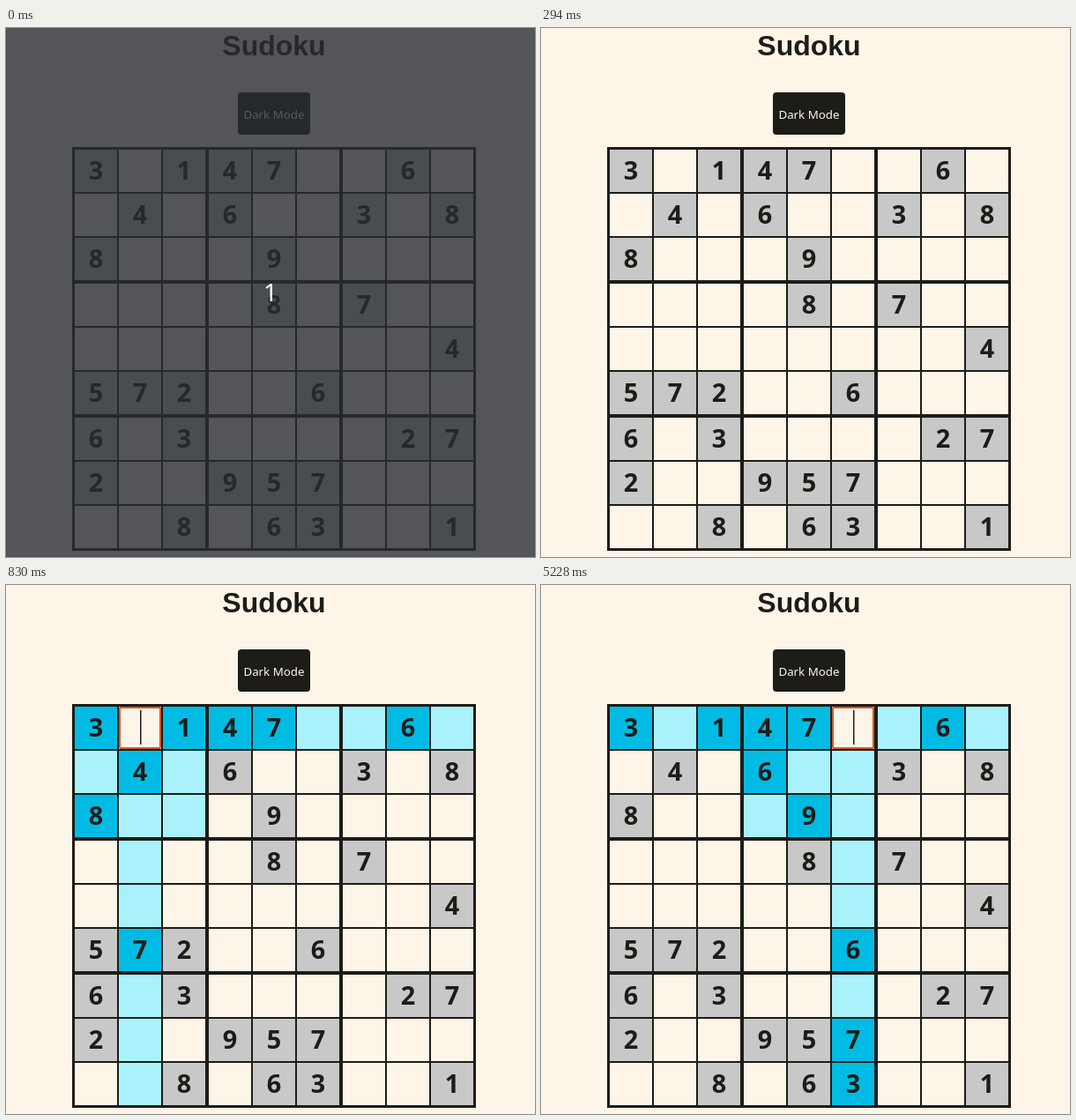
Animation of 600 by 600 pixels, one loop 8000 ms. Source, as an HTML page:

```html
<!DOCTYPE html>
<html lang="en">
<head>
<meta charset="utf-8">
<title>Sudoku</title>
<style>
  html, body { margin: 0; width: 100%; height: 100%; overflow: hidden; }
  svg { display: block; width: 100vw; height: 100vh; }
  text { text-anchor: middle; font-family: "Noto Sans", "Open Sans", sans-serif; }
  .title { font: bold 32px "Liberation Sans", Arial, sans-serif; }
  .label { font-size: 13.333px; }
  .digit { font-size: 28.8px; font-weight: bold; }
  .count { font-size: 28px; }
</style>
</head>
<body>
<svg id="stage" viewBox="0 0 600 600"></svg>
<script>
const LOOP = 8000;
const START = 30;
const PICKS = [
  { at: 470, row: 0, col: 1 },
  { at: 1070, row: 0, col: 5 }
];
const PUZZLE = [
  "3.147..6.",
  ".4.6..3.8",
  "8...9....",
  "....8.7..",
  "........4",
  "572..6...",
  "6.3....27",
  "2..957...",
  "..8.63..1"
];
const BRIGHT = {
  page: "#fef5e9", ink: "#1d1c17", label: "#fef5e9", given: "#c8c8c8",
  litGiven: "#00bce4", lit: "#a9f2fc"
};
const DIMMED = { page: "#545559", ink: "#25292d", label: "#575a5d", given: "#484d50" };
const CELL = 48;

const stage = document.getElementById("stage");

function add(tag, attrs, content = "") {
  const el = document.createElementNS("http://www.w3.org/2000/svg", tag);
  for (const key in attrs) el.setAttribute(key, attrs[key]);
  el.textContent = content;
  stage.appendChild(el);
  return el;
}

const addRect = (x, y, width, height, more = {}) =>
  add("rect", { x, y, width, height, ...more });
const addText = (x, y, name, content) =>
  add("text", { x, y, class: name }, content);

// Thin lines are 2 wide; box lines are 4 wide.
const offset = i => i * (CELL + 2) + Math.floor(i / 3) * 2;
const cellX = col => 78 + offset(col);
const cellY = row => 138 + offset(row);

const page = addRect(0, 0, 600, 600);
const title = addText(304, 31, "title", "Sudoku");
const button = addRect(263, 73, 82, 48, { rx: 4 });
const label = addText(304, 103, "label", "Dark Mode");
const frame = addRect(75, 135, 458, 458);

const cells = [];
PUZZLE.forEach((line, row) => [...line].forEach((char, col) => {
  const x = cellX(col), y = cellY(row);
  const given = char !== ".";
  const box = addRect(x, y, CELL, CELL);
  const digit = given ? addText(x + 24, y + 34, "digit", char) : null;
  cells.push({ row, col, given, box, digit });
}));

const ring = addRect(0, 0, 46, 46, {
  rx: 1, fill: "none", stroke: "#dc5424", "stroke-width": 2
});
const caret = addRect(0, 0, 1.5, 39, { fill: BRIGHT.ink });
const count = addText(300, 310, "count", "1");
count.setAttribute("fill", "#fff");

const paint = (el, color) => el.setAttribute("fill", color);
const show = (el, on) => el.setAttribute("visibility", on ? "visible" : "hidden");

function move(el, x, y) {
  el.setAttribute("x", x);
  el.setAttribute("y", y);
}

const third = i => Math.floor(i / 3);

function isLit(cell, pick) {
  if (!pick) return false;
  const sameRow = cell.row === pick.row;
  const sameCol = cell.col === pick.col;
  if (sameRow && sameCol) return false;
  const sameBox = third(cell.row) === third(pick.row) && third(cell.col) === third(pick.col);
  return sameRow || sameCol || sameBox;
}

function draw(time) {
  const dim = time < START;
  const colors = dim ? DIMMED : BRIGHT;
  const pick = PICKS.filter(p => time >= p.at).pop();

  paint(page, colors.page);
  [title, button, frame].forEach(el => paint(el, colors.ink));
  paint(label, colors.label);

  for (const cell of cells) {
    const lit = isLit(cell, pick);
    const fill = cell.given
      ? (lit ? colors.litGiven : colors.given)
      : (lit ? colors.lit : colors.page);
    paint(cell.box, fill);
    if (cell.digit) paint(cell.digit, colors.ink);
  }

  show(count, dim);
  show(ring, pick);
  show(caret, pick);
  if (pick) {
    const x = cellX(pick.col), y = cellY(pick.row);
    move(ring, x + 1, y + 1);
    move(caret, x + 24, y + 4);
  }
}

const begin = performance.now();

function tick() {
  draw((performance.now() - begin) % LOOP);
  requestAnimationFrame(tick);
}

tick();
</script>
</body>
</html>
```
